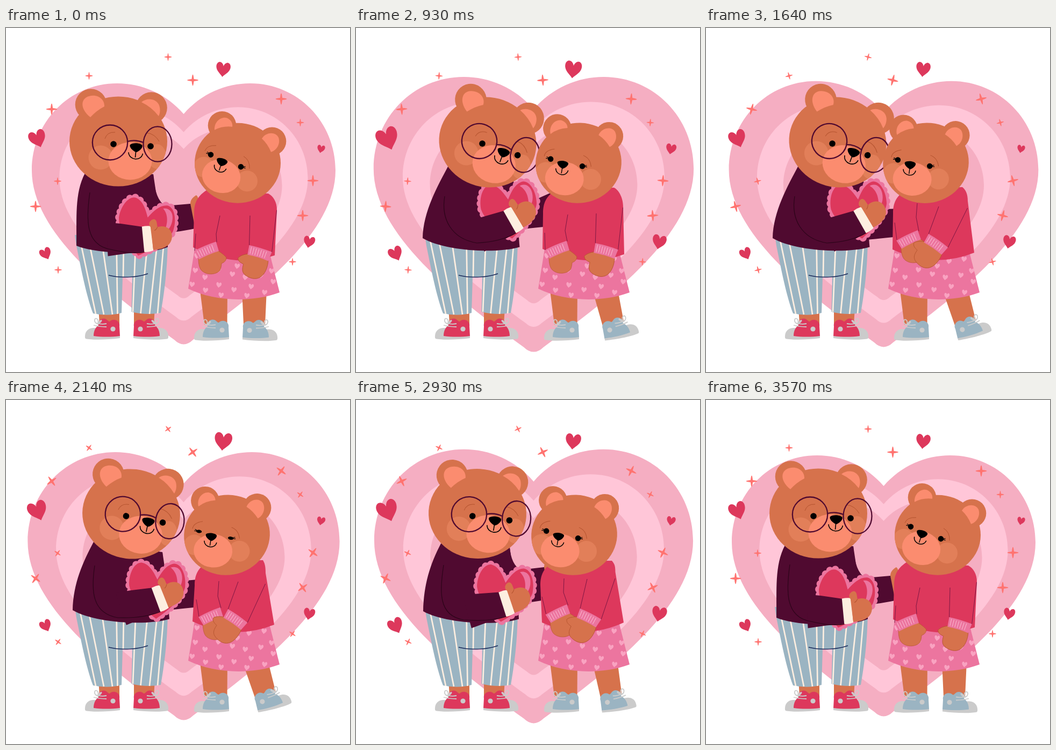
Recreate the animation shown at these times as an HTML page with a canvas. Size 640x640 px, loop 3640 ms.

```html
<!DOCTYPE html>
<html lang="en">
<head>
<meta charset="utf-8">
<title>Bears in love</title>
<style>
html, body { margin: 0; height: 100%; overflow: hidden; background: #fff; }
canvas { display: block; }
</style>
</head>
<body>
<canvas id="stage" width="640" height="640"></canvas>
<script>
const c = document.getElementById('stage').getContext('2d');
const FUR = '#d6724c', BLUSH = '#e27f59', PEACH = '#fb8c6f', LINE = '#b4532f';
const RED = '#dd385c', ROSE = '#ec759f', PALE = '#f9a3c1', PLUM = '#500a30';
const BLUE = '#9bb4c2', CREAM = '#fdeee0', GREY = '#cbcbcb', BLACK = '#000';
const LOOP = 3640, FPS = 14, KEYS = [0, 8, 13, 23, 30, 41, 50];
let frame = 0;

// Smooth, overshoot-free interpolation through one value per key time.
function key(...v) {
  v.push(v[0]);
  const slope = i => (v[i + 1] - v[i]) / (KEYS[i + 1] - KEYS[i]);
  const tangent = i => {
    if (i === 0 || i === KEYS.length - 1) return 0;
    const a = slope(i - 1), b = slope(i);
    return a * b <= 0 ? 0 : 2 * a * b / (a + b);
  };
  let i = 0;
  while (i < KEYS.length - 2 && frame >= KEYS[i + 1]) i++;
  const h = KEYS[i + 1] - KEYS[i], t = (frame - KEYS[i]) / h, u = 1 - t;
  return v[i] * (1 + 2 * t) * u * u + v[i + 1] * t * t * (3 - 2 * t) +
    h * (tangent(i) * t * u * u - tangent(i + 1) * t * t * u);
}

function paint(path, fill, stroke, width = 1) {
  if (fill) { c.fillStyle = fill; c.fill(path); }
  if (stroke) { c.strokeStyle = stroke; c.lineWidth = width; c.stroke(path); }
}
const shape = (d, fill, stroke, width) => paint(new Path2D(d), fill, stroke, width);
const line = (d, stroke, width) => shape(d, null, stroke, width);

function oval(x, y, rx, ry, fill, stroke, width, deg = 0) {
  const p = new Path2D();
  p.ellipse(x, y, rx, ry, deg * Math.PI / 180, 0, Math.PI * 2);
  paint(p, fill, stroke, width);
  return p;
}

function at(x, y, deg, draw, sx = 1, sy = sx) {
  c.save();
  c.translate(x, y);
  c.rotate(deg * Math.PI / 180);
  c.scale(sx, sy);
  draw();
  c.restore();
}

// Rotates and moves artwork that was drawn around the pivot (x, y).
const pose = (x, y, nx, ny, deg, draw) =>
  at(nx, ny, deg, () => { c.translate(-x, -y); draw(); });

const heart = (x, y, size, deg, color) => at(x, y, deg, () =>
  shape('M0 -.45C.1 -.85 .4 -1.05 .65 -1C1 -.9 1.1 -.45 .95 -.05C.8 .4 .3 .7 0 1.08' +
    'C-.3 .7 -.8 .4 -.95 -.05C-1.1 -.45 -1 -.9 -.65 -1C-.4 -1.05 -.1 -.85 0 -.45Z', color), size);

function backdrop() {
  const beat = frame < 26 ? Math.sin(Math.PI * frame / 26) : Math.sin(Math.PI * (frame - 26) / 24);
  const big = 'M330.5 160C298 122 252 103 207 103C118 103 48 175 48 265C48 380 190 490 313 580' +
    'Q330.5 597 348 580C471 490 613 380 613 265C613 175 543 103 454 103C409 103 363 122 330.5 160Z';
  const layer = (scale, cy, color) =>
    at(330.5, cy, 0, () => { c.translate(-330.5, -cy); shape(big, color); }, scale);
  at(330.5, 327, 0, () => {
    c.translate(-330.5, -327);
    layer(1, 345, '#f5aec2');
    layer(.818, 346, '#ffc6d8');
    layer(.648, 345, '#f5aec2');
  }, 1 + .054 * beat);
}

function sparkles() {
  const star = (r, turn, places) => places.forEach(([x, y]) => at(x, y, frame * turn, () =>
    shape('M0 -1Q.1 -1 .2 -.2Q1 -.1 1 0Q1 .1 .2 .2Q.1 1 0 1Q-.1 1 -.2 .2Q-1 .1 -1 0Q-1 -.1 -.2 -.2Q-.1 -1 0 -1Z',
      '#ff7370'), r));
  star(10.5, 7.2, [[512, 132], [571, 284], [55, 332]]);
  star(10.5, -7.2, [[85, 151], [347.5, 97], [552, 349]]);
  star(7, 7.2, [[154.5, 89], [547.5, 176], [533, 435], [96, 285], [97, 450]]);
  star(7, -7.2, [[301.5, 54]]);
}

function floatingHearts() {
  heart(404, 77, key(13, 17.3, 15.3, 13, 16, 14), 7, RED);
  heart(59, 206, key(15.5, 20, 20, 15.5, 17.5, 19), -20, RED);
  heart(586, 225, key(7, 8.3, 9.3, 7, 7.5, 8), 12, RED);
  heart(564, 398, key(10.3, 10.3, 12.7, 11.5, 10.3, 13.4), 12, RED);
  heart(74, 420, key(10.5, 14.2, 12.7, 10.5, 10.5, 13.7), -25, RED);
}

function shoe(color) {
  shape('M-33 16C-34 2 -24 -3 -14 -2L32 12V17C10 20 -20 21 -32 18Z', GREY);
  shape('M-17 13C-17 6 -15 -2 -8 -7C-11 -17 2 -24 9 -16C11 -14 13 -13 14 -15' +
    'C22 -21 33 -14 31 -5L32 13C15 15 -2 15 -17 13Z', color);
  oval(19, 0, 4.6, 4.6, GREY);
  line('M-17 -7Q-6 -4 7 -4M-12 -11Q-2 -8 7 -10M-9 -9C-20 -13 -14 -25 -9 -17Q-8 -13 -9 -9C-4 -20 3 -17 -9 -9', GREY, 1.8);
}

function nose(x, y, deg, scale) {
  at(x, y, deg, () => {
    shape('M-11.5 -4C-8 -9 8 -9 11.5 -4C13 1 5 8 1 9C-4 8 -13 1 -11.5 -4Z', BLACK);
    line('M0 8L-.5 19M-13.5 10C-12 25 11 26 13 11', BLACK, 1.6);
  }, scale);
}

// Head oval with cheeks kept inside its outline.
function skull(x, y, rx, ry, cheeks) {
  const outline = oval(x, y, rx, ry, FUR);
  c.save();
  c.clip(outline);
  for (const [cx, cy, cr, ch = cr] of cheeks) oval(cx, cy, cr, ch, BLUSH);
  c.restore();
}

function boyHead() {
  oval(158, 142.5, 29.3, 29.3, FUR);
  oval(270.5, 148.5, 29.3, 29.3, FUR);
  skull(209, 211, 91, 83.5, [[176, 241, 22.5], [281, 239, 17, 23]]);
  shape('M157 166C138 151 138 132 154 127C172 122 184 134 183 146Q169 153 157 166Z', PEACH);
  shape('M252 138C262 129 280 131 285 144C288 153 286 160 284 164Q271 147 252 138Z', PEACH);
  oval(231, 247.5, 40.5, 35, PEACH);
  line('M184 206Q188 193 203 194M262 195Q277 197 285 211', LINE);
  oval(200, 216, 5.8, 5.8, BLACK);
  oval(269, 220, 5.8, 5.8, BLACK);
  nose(242, 222, 3, 1);
  oval(193.5, 213, 32.7, 32.5, null, PLUM, 2.3);
  oval(282, 216, 26.5, 32.7, null, PLUM, 2.3);
  line('M226 211Q241 207 255.5 213', PLUM, 2.3);
}

function boyLegs() {
  shape('M172 520H211V552H174ZM238 520H277L275 552H238Z', FUR);
  at(180, 560, 0, () => shoe(RED));
  at(269, 560, 0, () => shoe(RED), -1, 1);
  shape('M128 385L131 405C140 450 150 500 162 531Q190 537 215 530L217 463H235L233.5 528' +
    'Q260 535 288 530C295 490 300 450 301 395Z', BLUE);
  line('M138 395L167 532M154 395L182 533M178 395L198 533M205.5 395L207.5 532M219 395L218 463' +
    'M241.5 395L236 528M264 395L250.5 531M282 395L267 532M294 395L282 531', CREAM, 2.7);
  line('M191 460C215 466 245 464 264 457', '#1b2a5a', 1.5);
}

function boyBody() {
  const sx = key(147, 160, 172, 172, 163, 158), sy = key(270, 258, 256, 256, 264, 267);
  const hx = key(131, 126, 124, 124, 124, 125), hy = key(405, 397, 391, 391, 391, 393);
  const hr = key(301, 303, 304.5, 304.5, 304, 303), hem = 298 + hy * .3;
  const rx = key(274, 285, 293, 293, 291, 286), ry = key(272, 285, 285, 285, 283, 275);
  const ex = key(297, 310, 314, 325, 300, 306), ey = key(331, 325, 328, 337, 339, 316);
  const tx = key(343, 360, 368, 368, 368, 350), ty = key(327, 307, 304, 336, 333, 311);
  const by = key(373, 362, 367, 386, 383, 371);
  at(tx, ty, 0, () => shape('M0 2C-1 -8 6 -13 11 -16C17 -12 16 5 14 30L8 46Z', FUR));
  shape(`M${rx} ${ry}Q${rx + 3} ${ey - 10} ${ex} ${ey}L${tx} ${ty}L${tx + 9} ${by}Q330 ${by + 5} 299 ${by + 8}L250 330Z`, PLUM);
  shape(`M${sx} ${sy}C${sx - 20} ${sy + 38} ${hx + 1} ${hy - 50} ${hx} ${hy}C165 ${hem} 262 ${hem + 5} ${hr} 407.5` +
    `C301 370 304 345 ${rx + 6} ${ry + 40}L${rx} ${ry}Z`, PLUM);
}

function card() {
  const x = key(259, 280, 285, 285, 281, 276), y = key(371, 342.5, 338, 338, 353, 359);
  at(x, y, key(14, -5, -6, -6, 2, 7), () => {
    const p = new Path2D('M0 -19C8 -34 16 -47 30 -49.5C44 -50 54 -28 52 -6C47 16 22 38 0 54' +
      'C-22 38 -47 16 -52 -6C-54 -28 -44 -50 -30 -49.5C-16 -47 -8 -34 0 -19Z');
    c.lineCap = 'round';
    paint(p, ROSE, ROSE, 8);
    c.setLineDash([0, 10.4]);
    paint(p, null, ROSE, 14);
    c.setLineDash([]);
    c.lineCap = 'butt';
    paint(p, RED);
    shape('M24 -42C36 -47 46 -38 46 -22C46 -11 42 -4 36 2C39 -14 38 -32 24 -42Z', ROSE);
  });
}

function boyArm() {
  const x = key(263, 286, 293, 293, 286.5, 280), y = key(392.5, 359, 357, 357, 369, 378);
  const deg = key(-3, -26, -27, -27, -18, -15), a = deg * Math.PI / 180;
  at(x, y, deg, () => {
    shape('M-7 -23L-48 -31L-75 -35V28L-40 25L-6 23.5Z', PLUM);
    shape('M-9 -23.5Q0 -25 8 -23.5L10 22Q0 25 -7 24Z', CREAM);
    shape('M7 -22C1 -29 9 -37 15 -36C20 -34 19 -26 20 -21C33 -25 46 -18 46 -4C46 12 33 21 10 21Z', FUR);
    line('M20 -21Q18 -17 14 -15', LINE);
  });
  const ex = x - 7 * Math.cos(a) - 24 * Math.sin(a), ey = y - 7 * Math.sin(a) + 24 * Math.cos(a);
  const mx = key(195, 215, 225, 225, 208, 200), my = key(412, 402, 400, 400, 405, 409);
  const sx = key(156, 161, 165, 165, 165, 163);
  line(`M${sx} ${key(306, 313, 313, 313, 308, 307)}C${sx - 7} 355 ${mx - 48} ${my - 8} ${mx} ${my}` +
    `Q${(mx + ex) / 2 + 8} ${(my + ey) / 2 + 7} ${ex} ${ey}`, '#2c0419', 1.2);
}

function girlLegs() {
  shape('M360 480L369 552H411.5L412 480Z', FUR);
  at(383, 562, 0, () => shoe(BLUE));
  pose(460, 480, 460, 480, key(0, -2.8, -13.2, -16.6, -16.6, -10.2), () => {
    shape('M438 465L442 552H482L486 465Z', FUR);
    at(472, 562.5, 0, () => shoe(BLUE), -1, 1);
  });
}

function skirt() {
  shape('M352 405L339 485C385 508 455 512 509 492L487 405Z', ROSE);
  const dots = [[352, 451], [370, 464], [396, 478], [346, 477], [371, 488], [400, 497], [424, 487], [448, 498],
    [456, 481], [474, 460], [481, 492], [497, 472], [494, 452], [430, 443], [480, 430], [452, 434],
    [421, 458], [445, 464], [355, 424], [395, 450]];
  for (const [x, y] of dots) heart(x, y, 4.8, 8, PALE);
}

function cuff() {
  shape('M-22 -9Q0 -11 22 -9L20 9Q0 7 -20 9Z', ROSE);
  for (let x = -17; x <= 17; x += 4.9) line(`M${x} -7L${x * .95} 6`, '#fbb9cf', 1);
}

function girlBody() {
  const l = key(350, 349, 348, 348, 351, 343), h = key(348, 348, 347, 347, 347, 346);
  const r = key(504, 503, 497, 487, 483, 482.5), ry = key(338, 338, 332, 322, 322, 320);
  const nx = key(488, 488, 480, 477, 478, 476), ny = key(308, 308, 297, 296, 298, 299);
  const hr = key(500, 500, 499, 499, 499, 498), hy = key(423, 423, 421, 418, 418, 414);
  shape(`M${l + 26} 300C${l + 6} 312 ${l} 325 ${l} 345L${h} ${key(408, 408, 411, 412, 412, 414)}Q425 448 ${hr} ${hy}` +
    `L${r} ${ry}C${r} ${ry - 14} ${nx + (r - nx) * .6} ${ny + 5} ${nx} ${ny}Z`, RED);

  const lx = key(374, 374, 375, 378, 382, 376.5), ly = key(414.5, 414.5, 413, 394, 403, 398);
  const px = key(471, 470, 464, 427, 426, 432.5), py = key(419, 418, 415, 403, 409, 406);
  const ldeg = key(-23, -23, -23, -26, -24, -26), pdeg = key(17, 17, 16, 35, 35, 27);
  at(lx, ly, ldeg, () => {
    shape('M-20 6C-24 16 -27 26 -22 33C-15 44 0 47 8 43C13 38 14 35 16 32C21 33 27 30 28 25C26 18 20 10 18 6Z', FUR, LINE, .6);
    cuff();
  });
  at(px, py, pdeg, () => {
    shape('M-19 7C-26 10 -33 15 -35 20C-33 27 -26 27 -22 28C-22 38 -20 43 -14 46C-4 50 8 50 15 42C22 34 23 20 20 8Z', FUR, LINE, .8);
    cuff();
  });
  const ax = key(398, 397, 394, 393, 396, 387), ay = key(349, 349, 347, 326, 337, 332);
  const bx = key(454, 453, 447, 433, 432, 430), by = key(349, 348, 345, 332, 338, 333);
  const a = pdeg * Math.PI / 180;
  const corner = s => `${px + s * 22 * Math.cos(a) + 9 * Math.sin(a)} ${py + s * 22 * Math.sin(a) - 9 * Math.cos(a)}`;
  line(`M${ax} ${ay}L${key(391, 391, 389, 391, 394, 386)} ${key(383, 383, 377, 352, 365, 358)}L${lx + 18} ${ly - 16}` +
    `M${bx} ${by}L${corner(-1)}M${r - .5} ${ry + key(1, 1, 2, 13, 20, 12)}L${corner(1)}` +
    `M${l + 3} ${ly - 32}L${lx - 23} ${ly}`, '#7d1744', 1);
}

function girlHead() {
  const open = Math.min(1, .12 + .45 * Math.abs(frame - 31));
  const eye = (x, y, side) => at(x, y, 18, () => {
    oval(0, 0, 5.2, 5.2 * open, BLACK);
    line(`M${side * 3} -1L${side * 8} -3M${side * 3} 0L${side * 9} 0`, BLACK, 1.2);
  });
  oval(402, 181.5, 26.3, 26.3, FUR);
  oval(495, 211, 26.3, 26.3, FUR);
  skull(431, 251.5, 80, 74.5, [[368, 259, 19], [448.5, 285, 19.5]]);
  shape('M388 190C387 174 401 164 412 168C420 172 422 179 421 184Q403 182 388 190Z', PEACH);
  shape('M476 206C484 193 502 193 507 204C511 215 504 228 493 231Q487 216 476 206Z', PEACH);
  oval(400.5, 276, 36, 31, PEACH, null, 0, 14);
  line('M370 229Q374 218 391 219M442 239Q454 246 453 262', LINE);
  eye(381, 236, -1);
  eye(437, 258.5, 1);
  nose(401.5, 249.5, 16, .88);
}

function render() {
  c.clearRect(0, 0, 640, 640);
  backdrop();
  sparkles();
  floatingHearts();
  boyLegs();
  boyBody();
  card();
  boyArm();
  pose(209, 211, key(209, 233, 245, 245, 233, 226), key(211, 211, 212.5, 212.5, 212, 211.5),
    key(0, 10.7, 15, 15, 6.7, 3.3), boyHead);
  girlLegs();
  skirt();
  girlBody();
  pose(431, 251.5, key(431, 427.5, 414, 409, 411, 406), 251.2, key(0, -1.8, -9, -10.8, -9.9, -9), girlHead);
}

// Pictures change on the nearest hundredth of a second, hence the 5 ms lead.
function tick(now) {
  frame = Math.min(50, Math.floor((now % LOOP + 5) * FPS / 1000));
  render();
  requestAnimationFrame(tick);
}
requestAnimationFrame(tick);
</script>
</body>
</html>
```
